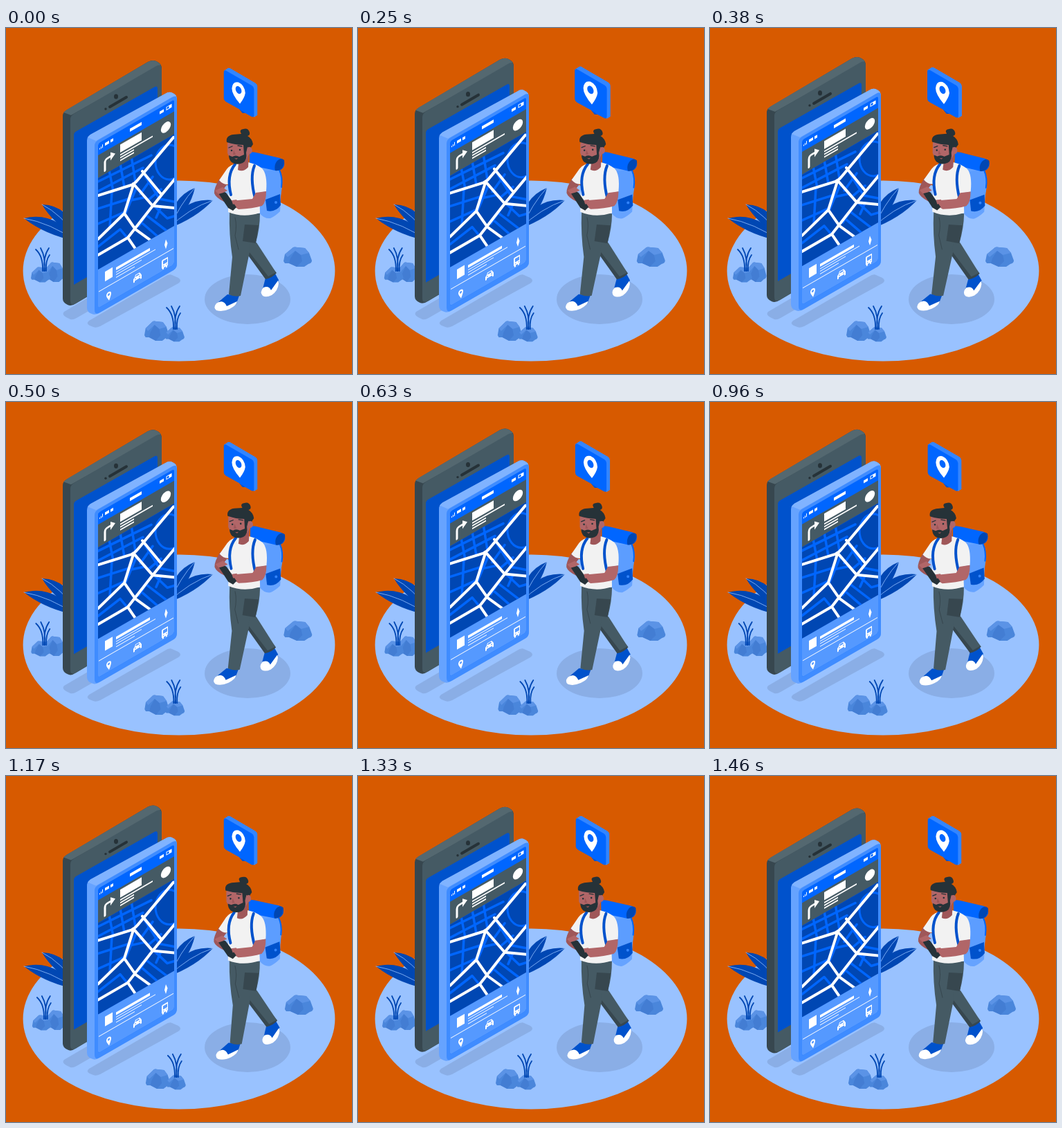
Recreate the animation shown at these times as an HTML page. Size 500 px wide and 500 px high, loop 1.5 s.

```html
<!DOCTYPE html>
<html lang="en">
<head>
<meta charset="utf-8">
<title>Navigation</title>
<style>
html, body { margin: 0; width: 100%; height: 100%; overflow: hidden; background: #d75a00; }
svg { display: block; width: 100vw; height: 100vh; }
.line { fill: none; stroke-linecap: round; stroke-linejoin: round; }
</style>
</head>
<body>
<svg viewBox="0 0 500 500">
  <defs>
    <g id="rock">
      <path fill="#4a86db" d="M0 21 2 11 14 1Q16 0 20 1L31 2 37 9 41 20Q41 24 36 25L30 29 19 29 8 24 2 24Z"/>
      <path fill="#5b93e6" d="M14 1Q16 0 20 1L31 2 37 9 25 12 17 6 6 15 2 11Z"/>
      <path fill="#3f78cf" d="M17 6 25 12 27 21 19 29 8 24 10 17Z" opacity=".65"/>
    </g>
    <g id="grass" class="line" stroke="#0047b3" stroke-width="1.800">
      <path d="M7 33Q8 12-3 2M9 33Q12 14 4 0M10 33Q7 13 16 0M12 33Q11 18 17 10"/>
    </g>
    <clipPath id="mapArea"><path d="M133 217 243 153.500V286L133 349Z"/></clipPath>
  </defs>

  <rect width="500" height="500" fill="#d75a00"/>
  <ellipse cx="250" cy="351" rx="225.400" ry="130.400" fill="#99c2ff"/>
  <g fill="#8aaee6">
    <ellipse cx="349" cy="392" rx="62" ry="36"/>
    <path d="M84 410Q80 414 87 418L93 421Q97 422 102 419L210 357 190 348Z"/>
    <path d="M120 423Q115 427 121 430L126 432Q130 434 136 431L249 369Q255 365 249 361L240 357Q236 355 230 359Z"/>
  </g>
  <g id="plants"></g>

  <g class="shake">
    <use href="#rock" transform="translate(55 338) scale(.72 1)"/>
    <use href="#rock" transform="translate(36 345) scale(.68 .78)"/>
    <use href="#grass" transform="translate(46 318)"/>
  </g>
  <g class="shake"><use href="#rock" transform="translate(401 316)"/></g>
  <g class="shake">
    <use href="#rock" transform="translate(200 423) scale(.86 1)"/>
    <use href="#rock" transform="translate(230 432) scale(.68 .73)"/>
    <use href="#grass" transform="translate(235 402)"/>
  </g>

  <g id="phones">
    <!-- back body -->
    <path fill="#37474f" d="M82 127Q82 122 87 119L205 49Q213 45 219 49 225 52 225 59V318Q225 324 219 328L101 398Q94 403 89 400 82 397 82 391Z"/>
    <path fill="#546870" d="M83 122 88 118 205 49Q213 45 219 49L224 53 94 126Z"/>
    <path fill="#455a64" d="M93 132Q93 127 98 124L217 55Q225 51 225 59V318Q225 324 219 328L101 398Q93 402 93 394Z"/>
    <path fill="#0052cc" d="M98 155Q98 151 102 149L215 85Q219 83 219 88V301L98 371Z"/>
    <g fill="#263238">
      <path class="line" stroke="#263238" stroke-width="4" d="M150 114 174 100"/>
      <ellipse cx="159" cy="99" rx="3" ry="3.600"/><circle cx="144" cy="117" r="1.700"/>
    </g>
    <!-- front body -->
    <path fill="#66a3ff" d="M117 163Q117 157 122 154L230 95Q236 91 241 94 247 96 247 103V341Q247 347 242 350L136 411Q129 416 124 413 117 411 117 404Z"/>
    <path fill="#80b3ff" d="M118 158 122 154 230 95Q236 91 241 94L246 98 130 163Z"/>
    <path fill="#3f8cff" d="M128 170Q128 165 133 162L240 100Q247 96 247 104V341Q247 347 242 350L136 411Q128 416 128 407Z"/>
    <g transform="matrix(1 -.577 0 1 133 167)">
      <rect width="110" height="238" rx="3" fill="#0066ff"/>
      <rect y="17" width="110" height="33" fill="#455a64"/>
      <path fill="#5599ff" d="M0 182H110V235Q110 238 107 238H3Q0 238 0 235Z"/>
      <g fill="#fff">
        <path d="M2 8h1v2H2ZM4 7h1v3H4ZM6 5h1v5H6ZM10 5h6v4H10ZM18 5h4v4H18ZM46 5H63V9.500H46ZM89 5h6v4H89Z"/>
        <path d="M98.500 4h8v5h-8Zm1 1v3h3V5Z" fill-rule="evenodd"/>
        <path d="M32 20H63V31.500H32ZM32 34H79V36H32ZM32 38H52V40H32ZM32 42H52V44H32Z"/>
        <circle cx="98" cy="33" r="7.200"/>
        <path d="M18 23 25 29 18 35Z"/>
        <path d="M10 191H21V205H10ZM26 194H75V198H26ZM26 200.500H83V201.500H26ZM26 204H63V205H26ZM26 208H53V209H26Z"/>
        <path d="M1 214H109V215H1Z"/>
        <path d="M98 195 100.500 202 98 209 96 202Z"/>
        <path fill-rule="evenodd" d="M16 236Q12 229 12 227A3.500 3.700 0 0 1 19 227Q19 230 16 236ZM15.500 225.500A1.600 1.600 0 1 0 15.600 225.500Z"/>
        <path fill-rule="evenodd" d="M51 228V226L53 224 54 221H60L62 224 63 226V231H61V229H53V231H51ZM55 222 54 224H60L59 222ZM53 226V227H55V226ZM59 226V227H61V226Z"/>
        <path fill-rule="evenodd" d="M93 222H101V234H100V236H98V234H95V236H93V234H92V223ZM94 224V229H100V224ZM94 231V232H95.500V231ZM98.500 231V232H100V231Z"/>
      </g>
      <path class="line" stroke="#fff" stroke-width="3" d="M10 45V33Q10 29 14 29H19"/>
    </g>
    <!-- map -->
    <g clip-path="url(#mapArea)" class="line">
      <path fill="#0047b3" d="M133 150H243V350H133Z"/>
      <path stroke="#0066ff" stroke-width="3.500" d="M133 222 210 184M133 236 198 202M148 200 155 236M164 190 171 230M181 185 187 222M133 261 177 247M133 283 171 266M153 236 150 288M176 250 199 245M188 232 173 267M205 249 224 233M194 240 212 215M198 209 220 244M211 258 202 270 236 296M204 268 192 286M222 247 243 251M198 283 220 302M214 257 233 275 243 272M224 258 217 274M133 316 165 291 175 303"/>
      <ellipse cx="236" cy="194" rx="20" ry="25" fill="#0047b3" stroke="#0066ff" stroke-width="3"/>
      <path stroke="#fff" stroke-width="4" d="M133 242 181 227Q186 225 190 220L242 158M184 227 171 268 187 291M133 305 171 268M184 225 212 257 243 260M197 207 225 241 245 217M225 241 212 257 176 303 191 325M133 328 176 303M187 291 209 307"/>
    </g>
  </g>

  <g id="man">
    <!-- backpack -->
    <path fill="#66a3ff" d="M364 200 392 203Q399 206 398 225L396 265Q389 272 382 275 373 276 367 268Z"/>
    <path fill="#5c9dff" d="M373 207 394 204Q400 211 399 229L397 243 375 249Z"/>
    <path fill="#0052cc" d="M375 248 396 240 397 256Q389 267 377 264Z"/>
    <path class="line" stroke="#0066ff" stroke-width="2" d="M395 205Q400 216 398 230"/>
    <circle cx="390" cy="252" r="2" fill="#3385ff"/>
    <path fill="#0066ff" d="M352 180Q356 178 366 181L396 188Q404 191 402 199 399 207 389 206L352 198Z"/>
    <path fill="#0047b3" d="M391 193Q397 186 402 191 403 199 398 204 393 207 389 206 387 199 391 193Z"/>
    <!-- legs and shoes -->
    <path fill="#0052cc" d="M375 361 389 355 394 364 391 375 385 381 371 377Z"/>
    <path fill="#fff" d="M372 375Q380 372 383 379L393 365 394 369Q393 380 384 386 376 390 371 387 366 382 372 375Z"/>
    <path fill="#37474f" d="M340 290 359 302 361 317 391 354Q385 361 375 363L348 326Z"/>
    <path fill="#0052cc" d="M320 385 337 387 333 398 323 405 307 396Z"/>
    <path fill="#fff" d="M304 398Q314 391 319 402L334 395Q333 401 323 406 312 411 304 408 299 404 304 398Z"/>
    <path fill="#455a64" d="M323 266 367 268Q367 289 361 310L354 314 339 387Q330 389 322 385L327 331Q322 298 323 266Z"/>
    <path fill="#455a64" d="M352 311 362 310 390 353 379 359 351 323Z"/>
    <path fill="#37474f" d="M345 284 365 285 361 311 342 308Z"/>
    <path class="line" stroke="#37474f" d="M331 274Q334 286 331 300L336 320"/>
    <!-- shirt, straps, arms -->
    <path fill="#9f5759" d="M309 217Q300 232 301 239 303 245 315 251L323 244 312 236 321 224Z"/>
    <path fill="#f2f2f2" d="M336 195Q324 197 319 204L308 220Q314 227 322 226L321 266Q343 275 367 267L366 238 376 236Q378 211 370 203 363 197 350 194Z"/>
    <path fill="#9f5759" d="M337 188 351 182 350 201Q343 209 335 205Z"/>
    <path class="line" stroke="#0052cc" stroke-width="4" d="M331 197Q318 213 325 241M359 199Q352 216 360 246"/>
    <path fill="#b16668" d="M361 238 376 236Q376 252 370 257 357 261 336 262L326 256Q327 249 335 249L356 247Z"/>
    <path fill="#263238" d="M307 239Q307 236 313 236L318 238 333 259 328 264 321 260Z"/>
    <path fill="#b16668" d="M326 249 333 248 336 252 328 255ZM302 235 313 230 320 235 314 238 307 240Z"/>
    <!-- head -->
    <path fill="#b16668" d="M320 166 349 158 355 177 346 191Q333 199 324 190L320 181Z"/>
    <path fill="#263238" d="M319 165Q317 156 328 154L340 153Q336 147 343 146 350 144 352 151 353 155 349 156 356 160 357 168L353 174 349 172 347 180Q349 191 342 195 333 199 326 194 322 190 322 184L327 186Q332 183 337 186L344 183 343 169Q331 169 319 165Z"/>
    <ellipse cx="352" cy="177" rx="3.800" ry="5" fill="#b16668"/>
    <path fill="#9f5759" d="M329 176 328 183 332 183Z"/>
    <path fill="#9f5759" d="M330 188.500 335 188 333 190Z"/>
    <g fill="#263238"><circle cx="326" cy="177" r="1.300"/><circle cx="338" cy="176" r="1.300"/></g>
    <path class="line" stroke="#263238" stroke-width="1.300" d="M322 173 327 171M335 170 341 171"/>
  </g>

  <g id="bubble">
    <path fill="#3385ff" d="M314 61 320 57Q322 56 325 58L361 79Q364 81 364 84V127L359 130 352 120Z"/>
    <path fill="#0066ff" d="M314 63Q314 59 318 61L356 83Q359 85 359 88V127Q359 131 355 129L346 124 342 124 337 118 317 107Q314 105 314 102Z"/>
    <path fill="#0052cc" d="M337 118 346 124 342 124Z"/>
    <path fill="#fff" fill-rule="evenodd" d="M338 110Q326 96 326 87 327 76 336 78 345 82 346 94 345 101 338 110ZM336 84C330 82 330 92 336 95 342 97 342 87 336 84Z"/>
  </g>
</svg>
<script>
const DURATION = 1500;
const find = selector => document.querySelector(selector);

// Pointed leaf with a pale midrib, from its base to its tip
function leaf(x, y, tipX, tipY, bend, width) {
  const dx = tipX - x, dy = tipY - y, length = Math.hypot(dx, dy);
  const control = offset =>
    `${x + dx * .55 + dy / length * offset} ${y + dy * .55 - dx / length * offset}`;
  return `<path fill="#0047b3" d="M${x} ${y}Q${control(bend + width)} ${tipX} ${tipY}Q${control(bend - width)} ${x} ${y}Z"/>
    <path class="line" stroke="#99c2ff" stroke-width=".8" d="M${x} ${y}Q${control(bend)} ${tipX} ${tipY}"/>`;
}
find('#plants').innerHTML = [
  [102, 302, 52, 255, -9, 18], [102, 308, 26, 275, -9, 19],
  [236, 290, 273, 231, 6, 17], [234, 290, 299, 249, 9, 18]
].map(args => leaf(...args)).join('');

function bezier(x1, y1, x2, y2) {
  const at = (s, a, b) => 3 * (1 - s) ** 2 * s * a + 3 * (1 - s) * s * s * b + s ** 3;
  return x => {
    let low = 0, high = 1;
    for (let i = 0; i < 20; i++) {
      const mid = (low + high) / 2;
      if (at(mid, x1, x2) < x) low = mid; else high = mid;
    }
    return at(low, y1, y2);
  };
}

const linear = x => x;
const snap = bezier(.36, .07, .19, .97);
const easeInOut = bezier(.42, 0, .58, 1);

// Keys are [phase, value] pairs; easing applies between neighbours
function tween(keys, phase, ease = linear) {
  const next = keys.findIndex(key => key[0] > phase);
  const [p0, v0] = keys[next - 1], [p1, v1] = keys[next];
  return v0 + (v1 - v0) * ease((phase - p0) / (p1 - p0));
}

const FLOAT = [[0, 0], [.5, -10], [1, 0]];
const SWAY = [[0, 0], [.25, 1], [.75, -1], [1, 0]];
const SHAKE = [0, -1, 2, -4, 4, -4, 4, -4, 2, -1, 0].map((x, i) => [i / 10, x]);
const BEAT = [[0, .97], [.17, 1.03], [.33, .97], [.5, 1.03], [.67, .97], [1, .97]];
const shaking = document.querySelectorAll('.shake');

function draw(now) {
  const phase = now % DURATION / DURATION;
  const move = (element, value) => element.setAttribute('transform', value);
  move(find('#phones'), `translate(0 ${tween(FLOAT, phase)})`);
  move(find('#man'), `rotate(${tween(SWAY, phase)} 350 278)`);
  move(find('#bubble'), `translate(339 93) scale(${tween(BEAT, phase, easeInOut)}) translate(-339 -93)`);
  const shift = tween(SHAKE, phase, snap);
  shaking.forEach(element => move(element, `translate(${shift})`));
}

const start = performance.now();
function frame() {
  draw(performance.now() - start);
  requestAnimationFrame(frame);
}
frame();
</script>
</body>
</html>
```
